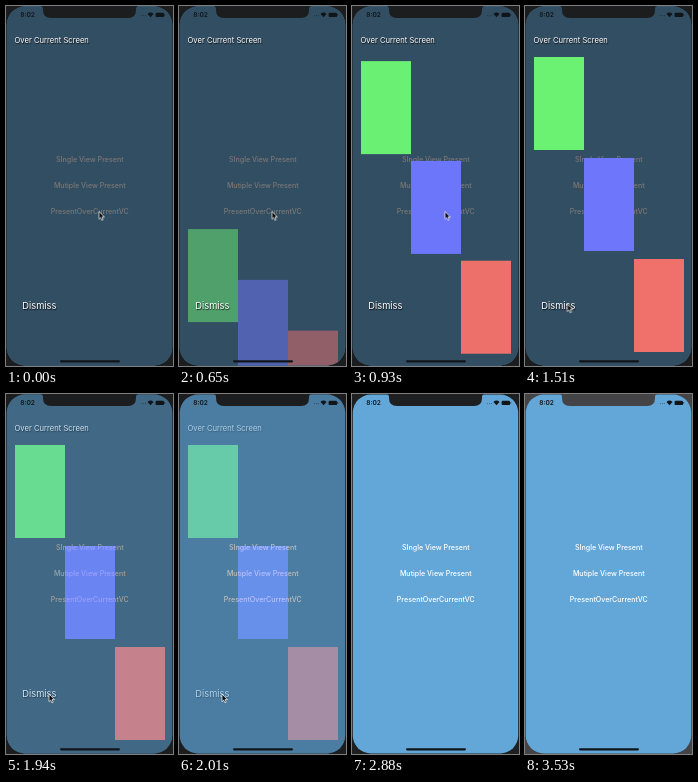
These frames come from a looping animation (167 by 360 pixels, 3600 ms). An HTML page:

```html
<!DOCTYPE html>
<html lang="en">
<head>
<meta charset="utf-8">
<title>Over Current Screen</title>
<style>
  html, body { margin: 0; width: 100%; height: 100%; overflow: hidden; background: #1c1d1f; }
  svg { display: block; width: 167px; height: 360px; font-family: Inter, "Liberation Sans", sans-serif; }
  .menu { font-size: 7.1px; font-weight: 500; text-anchor: middle; fill: #fff; }
  .label { fill: #fff; text-shadow: .6px .9px 1px rgba(0, 0, 0, .85); }
</style>
</head>
<body>
<svg viewBox="0 0 167 360">
  <defs>
    <clipPath id="glass"><rect x=".8" y=".6" width="165.4" height="358.8" rx="18"/></clipPath>
  </defs>
  <rect class="bezel" width="167" height="360"/>
  <g clip-path="url(#glass)">
    <rect width="167" height="360" fill="#63a7d9"/>
    <g class="menu">
      <text x="83.8" y="156.3">SIngle View Present</text>
      <text x="83.8" y="182.2">Mutiple View Present</text>
      <text x="83.8" y="207.7">PresentOverCurrentVC</text>
    </g>
    <g id="modal">
      <rect width="167" height="360" fill="rgb(12,7,2)" fill-opacity=".55"/>
      <g id="blocks"></g>
      <text class="label" x="8.5" y="37" font-size="7.65">Over Current Screen</text>
      <text class="label" x="16.3" y="303" font-size="9.3">Dismiss</text>
    </g>
    <g fill="#10151a">
      <text x="14.2" y="11.3" font-size="6.6" font-weight="600">8:02</text>
      <g opacity=".4">
        <circle cx="135.5" cy="9.6" r=".6"/><circle cx="137.5" cy="9.6" r=".6"/><circle cx="139.5" cy="9.6" r=".6"/>
      </g>
      <path d="M141.5 7.9Q144.5 5.3 147.5 7.9L144.5 11.2Z"/>
      <rect x="149.6" y="6.7" width="8.4" height="4.4" rx="1.2"/>
      <rect x="158.4" y="8.1" width=".7" height="1.6"/>
      <rect x="54" y="354.2" width="60" height="2.2" rx="1.1"/>
    </g>
  </g>
  <path class="bezel" d="M34 0Q37 0 37 3V4Q37 12 45 12H122Q130 12 130 4V3Q130 0 133 0Z"/>
  <path id="cursor" d="M0 0V7.6L1.7 6.1L2.9 8.8L4.2 8.2L3 5.6H5.4Z" fill="#0a0a0a" stroke="#fff" stroke-width=".7" stroke-linejoin="round"/>
</svg>
<script>
const LOOP = 3600;
const $ = id => document.getElementById(id);

// Each step: [ms, style, easing towards the next step]
function play(el, steps) {
  const frames = steps.map(([ms, style, easing = 'linear']) =>
    ({ offset: ms / LOOP, easing, ...style }));
  const anim = el.animate(frames, { duration: LOOP, iterations: Infinity });
  anim.startTime = document.timeline.currentTime;
}

const SMOOTH = 'ease-in-out';
const move = (x, y) => ({ transform: `translate(${x}px, ${y}px)` });

const START_Y = 397;
[['#6cf273', 51], ['#6e77fc', 152], ['#f0716c', 253]].forEach(([fill, y], i) => {
  const block = document.createElementNS('http://www.w3.org/2000/svg', 'rect');
  const attrs = { x: 9 + 50 * i, y, width: 50, height: 93, fill };
  for (const key in attrs) block.setAttribute(key, attrs[key]);
  $('blocks').append(block);

  const below = { ...move(0, START_Y - y), opacity: 0 };
  const shown = { ...move(0, 0), opacity: 1 };
  play(block, [[0, below], [317, below, SMOOTH], [983, shown], [LOOP, shown]]);
});

play($('modal'), [
  [0, { opacity: 1 }], [1750, { opacity: 1 }, SMOOTH],
  [2255, { opacity: 0 }], [LOOP, { opacity: 0 }]
]);

play($('cursor'), [
  [0, move(93, 205.5)], [1130, move(93, 205.5), SMOOTH],
  [1480, move(42, 297), 'ease-out'], [1650, move(43, 300)],
  [2030, move(43, 300), 'ease-in'], [2160, move(79, 301.5)],
  [2420, move(172, 300)], [LOOP, move(172, 300)]
]);

const dark = { fill: '#1c1d1f' }, light = { fill: '#444446' };
for (const part of document.querySelectorAll('.bezel')) {
  play(part, [[0, dark], [2850, dark], [3380, light], [LOOP, light]]);
}
</script>
</body>
</html>
```
